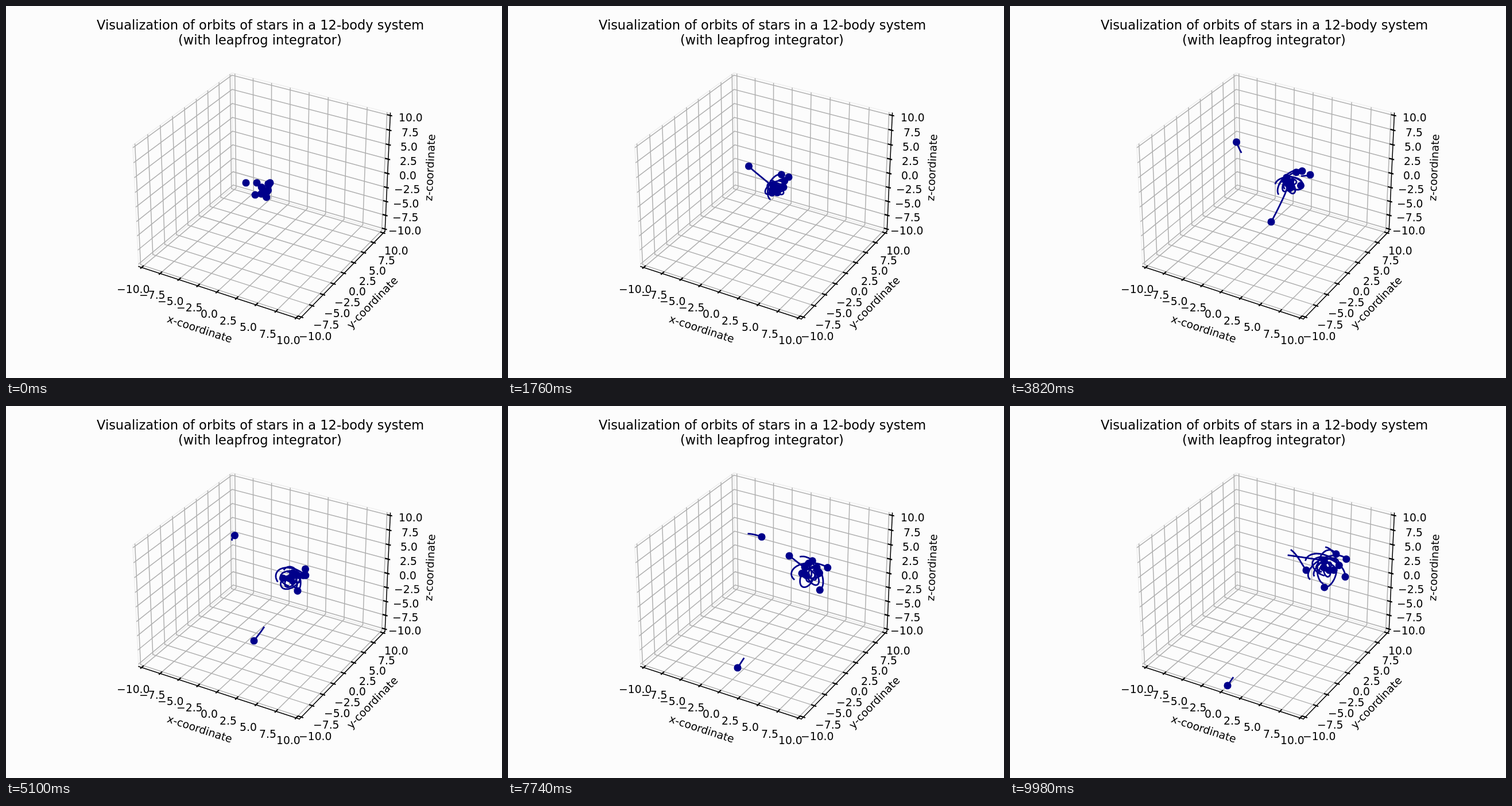
An HTML page with a canvas for the animation above (10 s loop, 864x648 px).

```html
<!DOCTYPE html>
<html lang="en">
<head>
<meta charset="utf-8">
<title>Orbits of stars</title>
<style>
html, body { margin: 0; width: 100%; height: 100%; overflow: hidden; background: #fcfcfc; }
canvas { display: block; }
</style>
</head>
<body>
<canvas width="864" height="648"></canvas>
<script>
const ctx = document.querySelector('canvas').getContext('2d');
const LOOP = 10000, STEP = 20, TRAIL = 1000, STAR_COLOR = '#00008b';
const E = 10 + 20 / 48;         // panes sit slightly outside the axis limits
const TICK_PAD = E + 1.729, LABEL_PAD = E + 3.757;
const TICKS = Array.from({ length: 9 }, (_, i) => 2.5 * i - 10);

// Perspective camera at azimuth -60, elevation 30, distance 10
function project([x, y, z]) {
  x *= 0.05714; y *= 0.05714; z *= 0.04286;
  const scale = 2697 / (10 - (0.433 * x - 0.75 * y + 0.5 * z));
  return [
    449.5 + scale * (0.866 * x + 0.5 * y),
    320.5 - scale * (-0.25 * x + 0.433 * y + 0.866 * z)
  ];
}

function polyline(points, color, width, cap = 'square') {
  ctx.beginPath();
  for (const p of points) ctx.lineTo(...p);
  ctx.strokeStyle = color;
  ctx.lineWidth = width;
  ctx.lineCap = cap;
  ctx.stroke();
}
const line3d = (points, ...style) => polyline(points.map(project), ...style);

function setFont(size, align) {
  ctx.font = `${size}px "DejaVu Sans", sans-serif`;
  ctx.textAlign = align;
  ctx.fillStyle = '#000';
}

// Level text snaps to whole pixels
function text(str, [x, y], size) {
  setFont(size, 'left');
  ctx.fillText(str, Math.round(x - ctx.measureText(str).width / 2), Math.ceil(y));
}

function slantedText(str, [x, y], angle) {
  setFont(18.75, 'center');
  ctx.save();
  ctx.translate(x, y);
  ctx.rotate(angle);
  ctx.fillText(str, 0, 4.5);
  ctx.restore();
}

// at(v, e): point at v along the axis, pushed out to e; grid(v): line across both panes
const axes = [
  { name: 'x', tickDir: 1, side: -1, at: (v, e) => [v, -e, -e],
    grid: v => [[v, -E, -E], [v, E, -E], [v, E, E]] },
  { name: 'y', tickDir: 0, side: 1, at: (v, e) => [e, v, -e],
    grid: v => [[E, v, -E], [-E, v, -E], [-E, v, E]] },
  { name: 'z', tickDir: 0, side: 1, at: (v, e) => [e, e, v],
    grid: v => [[-E, -E, v], [-E, E, v], [E, E, v]] }
];

function drawAxes() {
  for (const { grid } of axes)
    for (const v of [-E, E]) line3d(grid(v), '#efefef', 1.5, 'butt');
  for (const { grid } of axes)
    for (const v of TICKS) line3d(grid(v), '#b0b0b0', 1.5, 'butt');
  for (const { name, tickDir, side, at } of axes) {
    const ends = [at(-E, E), at(E, E)];
    line3d(ends, '#000', 1.5);
    for (const v of TICKS) {
      const inner = at(v, E), outer = at(v, E);
      inner[tickDir] -= side / 3;
      outer[tickDir] += side / 6;
      line3d([inner, outer], '#000', 2.2);
      const [x, y] = project(at(v, TICK_PAD));
      text(v.toFixed(1).replace('-', '−'), [x, y + 14.25], 18.75);
    }
    const [a, b] = ends.map(project);
    slantedText(name + '-coordinate', project(at(0, LABEL_PAD)),
      Math.atan2(b[1] - a[1], b[0] - a[0]));
  }
  text('Visualization of orbits of stars in a 12-body system', [442.8, 40.3], 22.5);
  text('(with leapfrog integrator)', [442.8, 66.5], 22.5);
}

// Smooth curve through a few [time, x, y] points
function path(...points) {
  const last = points.length - 1;
  const tangent = (i, k) => {
    const p = points[Math.max(i - 1, 0)], q = points[Math.min(i + 1, last)];
    return (q[k] - p[k]) / (q[0] - p[0]);
  };
  return t => {
    let i = 0;
    while (i < last - 1 && points[i + 1][0] <= t) i++;
    const p = points[i], q = points[i + 1], span = q[0] - p[0];
    const u = (t - p[0]) / span, w = 1 - u;
    return [1, 2].map(k =>
      p[k] * (1 + 2 * u) * w * w + q[k] * u * u * (3 - 2 * u) +
      span * u * w * (tangent(i, k) * w - tangent(i + 1, k) * u));
  };
}

// Bound star: a turning ellipse around the drifting, slowly widening cluster
function orbit(i) {
  const size = 8 + 2.5 * i, period = 900 + 170 * i;
  return t => {
    const phase = 2.4 * i + 2 * Math.PI * t / period;
    const tilt = 1.1 * i + t / 4000;
    const spread = size * (0.7 + 0.7 * t / LOOP);
    const along = spread * Math.cos(phase), across = 0.5 * spread * Math.sin(phase);
    return [
      451 + 0.0105 * t + along * Math.cos(tilt) - across * Math.sin(tilt),
      321 - 0.0043 * t + along * Math.sin(tilt) + across * Math.cos(tilt)
    ];
  };
}

const stars = [
  // flung up, then falls back into the cluster
  path([0, 418, 308], [760, 463, 319], [1760, 419.5, 279], [3820, 394.5, 237],
    [5100, 398.5, 225.5], [6400, 413, 222], [7740, 442, 228], [8980, 490, 251], [9980, 516, 286]),
  // escapes downwards
  path([0, 437, 308], [1760, 469, 325], [2900, 481, 322], [3820, 455, 376],
    [5100, 432, 409], [6400, 414.5, 434], [7740, 400, 456], [9980, 379, 487]),
  // makes a late wide turn to the left
  path([0, 460, 308], [1760, 489, 298], [3820, 523, 294], [5100, 521.5, 284],
    [6400, 523, 287], [7740, 490, 261], [8980, 485, 260], [9980, 547, 269]),
  ...Array.from({ length: 9 }, (_, i) => orbit(i))
];

function draw(now) {
  const t = Math.floor(now % LOOP / STEP) * STEP;
  ctx.fillStyle = '#fcfcfc';
  ctx.fillRect(0, 0, 864, 648);
  drawAxes();
  for (const position of stars) {
    const trail = [];
    for (let s = Math.max(0, t - TRAIL); s <= t; s += STEP) trail.push(position(s));
    if (t > 0) polyline(trail, STAR_COLOR, 2.8);
    ctx.beginPath();
    ctx.arc(...position(t), 6.56, 0, 2 * Math.PI);
    ctx.fillStyle = STAR_COLOR;
    ctx.fill();
  }
}

const start = performance.now();
function tick() {
  draw(performance.now() - start);
  requestAnimationFrame(tick);
}
tick();
</script>
</body>
</html>
```
